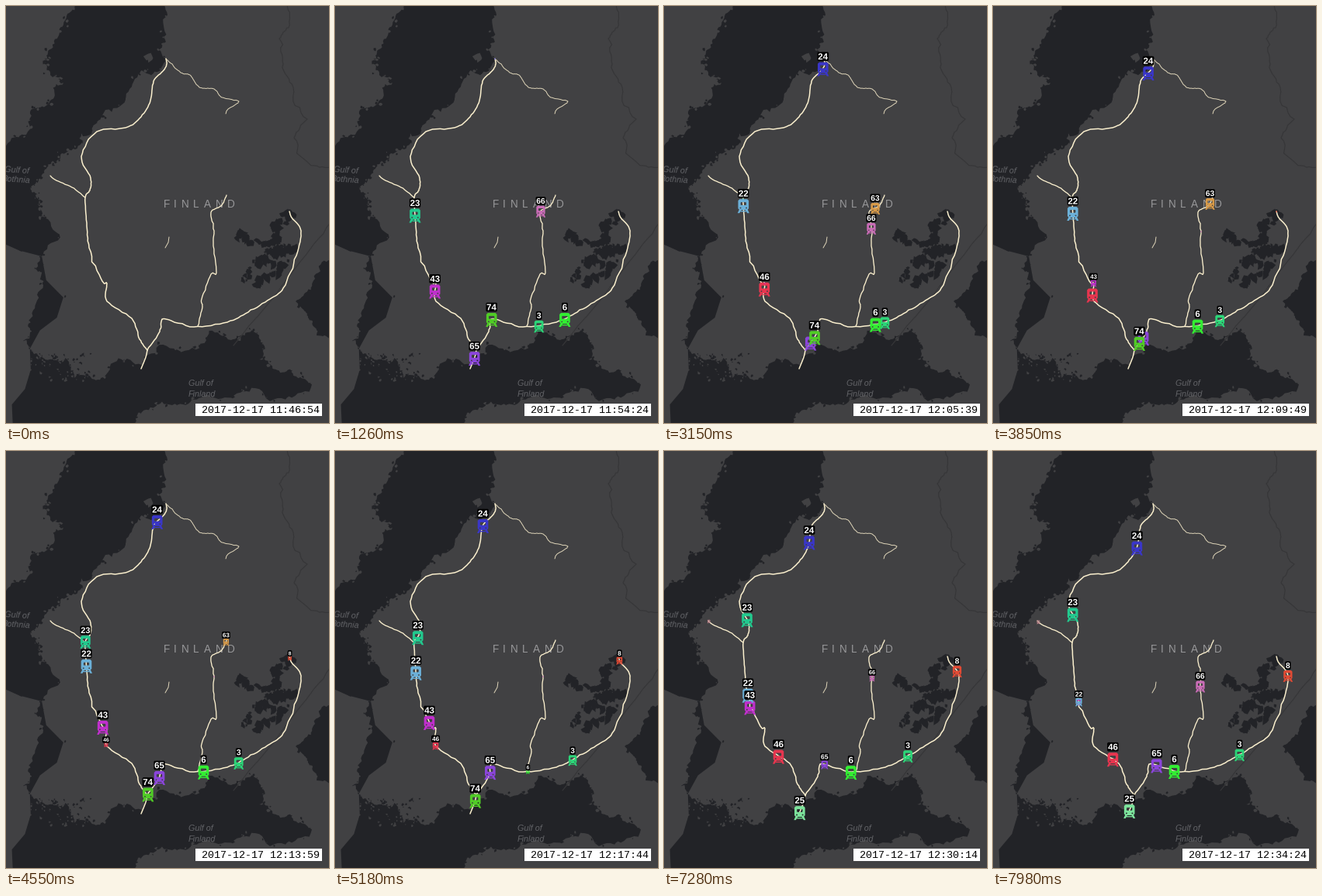
Animation, 416 px wide and 538 px high, one loop 8000 ms. Source, as a matplotlib script:

```python
import numpy as np
import matplotlib.pyplot as plt
from matplotlib.animation import FuncAnimation
from matplotlib.collections import PolyCollection
from matplotlib.patches import PathPatch, Polygon, Rectangle
from matplotlib.path import Path
from matplotlib.textpath import TextPath

W, H, DPI = 416, 538, 100
LOOP, TICK, INTERVAL = 8000, 70, 25
LAND, SEA, BORDER = "#414143", "#222327", "#363638"
RAIL, BRANCH = "#fcf1cf", "#e4dabd"
PT = 72 / DPI

rng = np.random.default_rng(7)
fig = plt.figure(figsize=(W / DPI, H / DPI), dpi=DPI, facecolor=LAND)
ax = fig.add_axes([0, 0, 1, 1])
ax.set_xlim(0, W)
ax.set_ylim(H, 0)
ax.axis("off")


def rough(pts, amount=0.05, levels=2):
    """Midpoint displacement along a polyline."""
    pts = np.array(pts, float)
    for _ in range(levels):
        d = np.diff(pts, axis=0)
        shift = rng.normal(0, amount, (len(d), 1)) * d[:, ::-1] * [1, -1]
        out = np.empty((2 * len(pts) - 1, 2))
        out[::2], out[1::2] = pts, (pts[:-1] + pts[1:]) / 2 + shift
        pts = out
    return pts


def curve(pts, n=4):
    """Catmull-Rom curve through a few points."""
    p = np.array(pts, float)
    p = np.vstack([2 * p[0] - p[1], p, 2 * p[-1] - p[-2]])
    a, b, c, d = (p[k:len(p) - 3 + k, None] for k in range(4))
    t = np.linspace(0, 1, n, endpoint=False)[None, :, None]
    mid = b + t / 2 * (c - a + t * (2 * a - 5 * b + 4 * c - d
                                    + t * (3 * (b - c) + d - a)))
    return np.vstack([mid.reshape(-1, 2), p[-2]])


def area(pts, amount=0.18, levels=4):
    shape = rough(pts + pts[:1], amount, levels)
    ax.add_patch(Polygon(shape, fc=SEA, ec="none", zorder=1))
    return shape


def blobs(centers, radius, color):
    turn = np.arange(6) * np.pi / 3
    ring = np.stack([np.cos(turn), np.sin(turn)], 1)
    shapes = [c + ring * rng.uniform(0.4, 1.5, (6, 1)) * rng.uniform(*radius)
              for c in centers]
    ax.add_collection(PolyCollection(shapes, facecolors=color,
                                     edgecolors="none", zorder=1))


def line(pts, color, width, z=4):
    ax.plot(*np.transpose(pts), color=color, lw=width * PT, zorder=z,
            solid_joinstyle="round", solid_capstyle="round")


def word(x, y, s, px, color, **kw):
    opts = dict(ha="center", va="center", family="Liberation Sans", zorder=3)
    return ax.text(x, y, s, fontsize=px * PT, color=color, **{**opts, **kw})


# Sea and Lake to the east
bay_west = [(98, -15), (74, 24), (54, 58), (53, 78), (74, 99), (55, 126),
            (28, 148), (-15, 192)]
gulf = [(150, 560), (168, 530), (214, 515), (265, 505), (330, 497),
        (394, 488), (364, 470), (326, 456), (326, 425), (290, 431),
        (240, 441), (175, 463), (125, 479), (90, 478), (48, 454)]
bay_east = [(22, 432), (40, 380), (44, 325), (46, 270), (33, 240), (50, 211),
            (72, 190), (97, 164), (128, 134), (166, 94), (203, 74), (203, 40),
            (197, -15)]
coast = area(bay_west + [(-15, 560)] + gulf + bay_east)
area([(430, 328), (398, 352), (373, 381), (389, 402), (400, 425), (430, 436)])
blobs([(182, 66), (184, 65), (187, 67)], (4, 6), LAND)

# Skerries and inlets
inside = (coast > 0).all(axis=1) & (coast[:, 1] < H)
shore = coast[inside]
for color, count in ((SEA, 170), (LAND, 130)):
    spots = shore[rng.integers(0, len(shore), count)]
    blobs(spots + rng.normal(0, 2.5, spots.shape), (0.7, 2.2), color)
blobs(rng.uniform([22, 445], [105, 484], (60, 2)), (0.7, 2), LAND)
blobs(rng.uniform([45, 448], [115, 478], (50, 2)), (0.7, 2), SEA)

# Lake district: ragged blobs strung along arms
for arm in ([(296, 296), (348, 310)], [(342, 290), (370, 266)],
            [(350, 316), (368, 314)], [(304, 354), (338, 318)],
            [(324, 360), (362, 330)], [(350, 290), (346, 326)]):
    k = rng.random((24, 1))
    spots = np.array(arm[0]) * (1 - k) + np.array(arm[1]) * k
    blobs(spots + rng.normal(0, 3, spots.shape), (2, 5.5), SEA)

# Borders
line(rough([(362, -3), (364, 28), (352, 42), (357, 75), (370, 105),
            (388, 146), (371, 170), (390, 203), (418, 208)], 0.1, 3),
     BORDER, 1.2, 1)
line(rough([(418, 279), (375, 335), (293, 438)], 0.03, 3), BORDER, 1.2, 1)

# Place names
for x, ch in zip((206.5, 218, 230.5, 245, 259.5, 275, 290), "FINLAND"):
    word(x, 256.5, ch, 13.5, "#98989a")
for x, y, s, tilt in ((251, 486.5, "Gulf of", 0), (252, 500.5, "Finland", 0),
                      (14, 212, "Gulf of", -4), (13, 224, "Bothnia", -4)):
    word(x, y, s, 10.8, "#626367", style="italic", rotation=tilt)

# Railways
JUNCTION = (182, 444)
north = curve([(206, 68), (207, 75), (203, 83), (190, 97), (186, 122),
               (174, 143), (154, 157), (117, 162), (97, 194), (109, 222),
               (108, 238), (102, 247), (104, 280), (107, 312), (124, 355),
               (130, 358), (130, 381), (162, 403), (172, 430), JUNCTION])
stem = curve([JUNCTION, (180, 453), (174, 468)])
karelia = curve([JUNCTION, (198, 420), (200, 407), (206, 404), (242, 414),
                 (285, 408), (312, 395), (340, 378), (357, 364), (374, 322),
                 (380, 290), (368, 273), (365, 265)])
savo = curve([(247, 413), (253, 388), (252, 378), (264, 346), (271, 344),
              (267, 305), (268, 290), (264, 266), (277, 258), (284, 244)])
coastal = curve([(57, 219), (63, 224), (85, 234), (102, 247)])
north, karelia, savo, coastal = (rough(r, 0.06, 1)
                                 for r in (north, karelia, savo, coastal))
for track, width in ((north, 1.5), (stem, 1.5), (karelia, 1.5),
                     (savo, 1.3), (coastal, 1.3)):
    line(track, RAIL, width)
line(rough(curve([(206, 68), (225, 86), (237, 89), (249, 105), (268, 107),
                  (278, 118), (300, 123), (286, 133), (283, 139)])),
     BRANCH, 0.95)
line([(205, 312), (209, 305), (210, 298)], BRANCH, 0.95)
west = np.vstack([north, stem[1:]])
east = np.vstack([stem[::-1], karelia[1:]])


def box(cx, cy, w, h, c=0.0):
    """Rectangle with cut corners."""
    x, y = w / 2, h / 2
    return np.array([(-x + c, -y), (x - c, -y), (x, -y + c), (x, y - c),
                     (x - c, y), (-x + c, y), (-x, y - c), (-x, -y + c)]) + [cx, cy]


def compound(*rings):
    return Path.make_compound_path(
        *[Path(np.vstack([r, r[:1]]), closed=True) for r in rings])


leg = np.array([(-0.38, 0.4), (-0.18, 0.4), (-0.34, 0.7), (-0.52, 0.7)])
ICON = compound(box(0, -0.06, 0.94, 0.96, 0.13),
                box(0, -0.14, 0.5, 0.26, 0.04)[::-1],
                box(-0.26, 0.24, 0.12, 0.11, 0.02)[::-1],
                box(0.26, 0.24, 0.12, 0.11, 0.02)[::-1],
                leg, (leg * [-1, 1])[::-1], box(0, 0.54, 0.5, 0.09))


def place(path, scale, x, y):
    return Path(path.vertices * scale + [x, y], path.codes)


class Train:
    """Runs from stop to stop; its icon grows with its speed."""

    def __init__(self, label, color, route, stops, full=14.5, ramp=700):
        self.route, self.full, self.ramp = route, full, ramp
        steps = np.hypot(*np.diff(route, axis=0).T)
        self.arc = np.concatenate([[0], np.cumsum(steps)])
        self.stops = [(t, self.locate((x, y))) for t, x, y in stops]
        z = 5 + 0.01 * len(trains)
        self.icon, self.back, self.text = (
            ax.add_patch(PathPatch(Path([(0, 0)]), fc=fc, lw=0, zorder=z + dz))
            for fc, dz in ((color, 0), ("black", 1), ("white", 1.005)))
        self.glyphs = None
        if label:
            tp = TextPath((0, 0), label, size=1,
                          prop=dict(family="Liberation Sans", weight="bold"))
            ext = tp.get_extents()
            mid = [(ext.x0 + ext.x1) / 2, (ext.y0 + ext.y1) / 2]
            self.glyphs = Path((tp.vertices - mid) * [1, -1], tp.codes)
            self.span = ext.width

    def locate(self, p):
        """Arc length of the point on the route closest to p."""
        a, d = self.route[:-1], np.diff(self.route, axis=0)
        k = np.clip(((p - a) * d).sum(1) / (d ** 2).sum(1), 0, 1)
        i = np.argmin(np.hypot(*(a + k[:, None] * d - p).T))
        return self.arc[i] + k[i] * (self.arc[i + 1] - self.arc[i])

    def state(self, t):
        """Arc position and icon size under a trapezoid speed profile."""
        r = self.ramp
        for (t0, a0), (t1, a1) in zip(self.stops, self.stops[1:]):
            if t0 <= t < t1:
                u, v = t - t0, t1 - t
                if u < r:
                    run = u * u / (2 * r)
                elif v < r:
                    run = t1 - t0 - r - v * v / (2 * r)
                else:
                    run = u - r / 2
                speed = min(1, u / r, v / r) if a0 != a1 else 0
                rest = 1.5 if len(self.stops) > 2 else 0
                return (a0 + (a1 - a0) * run / (t1 - t0 - r),
                        max(rest, self.full * speed))
        return 0, 0

    def update(self, t, taken):
        at, s = self.state(t) if t > 0 else (0, 0)
        x, y = (np.interp(at, self.arc, self.route[:, k]) for k in (0, 1))
        self.icon.set_visible(s > 0.8)
        self.icon.set_path(place(ICON, s, x, y))
        show = self.glyphs is not None and s > 2.5
        if show:
            em, ly = 4.2 + 0.5 * s, y - s - 0.8
            w, h = em * self.span + 2.4, em * 0.72 + 3.4
            show = all(abs(x - a) > (w + c) / 2 - 1 or abs(ly - b) > (h + d) / 2 - 1
                       for a, b, c, d in taken)
        if show:
            taken.append((x, ly, w, h))
            self.back.set_path(compound(box(x, ly, w, h, 1.2)))
            self.text.set_path(place(self.glyphs, em, x, ly))
        self.back.set_visible(show)
        self.text.set_visible(show)


trains = []


def add(*args, **kw):
    trains.append(Train(*args, **kw))


# Stops: time in ms, x, y
add("46", "#e8354f", west, [(2300, 130, 359), (4800, 129, 379), (9000, 160, 402)])
add("43", "#c02fcc", west, [(-600, 130, 384), (2500, 130, 358),
                            (3500, 130, 358), (8300, 112, 323)])
add("23", "#22c98e", west, [(-700, 104, 295), (2900, 103, 249),
                            (3900, 103, 249), (9500, 98, 198)])
add("22", "#6bb0d8", west, [(2150, 103, 248), (8400, 112, 325)])
add("24", "#3a36c8", west, [(1100, 206, 68), (9700, 181, 133)], ramp=1600)
add("63", "#d89a48", savo, [(2100, 264, 266), (5000, 284, 244)], full=12)
add("66", "#c96cb6", savo, [(-500, 277, 254), (3900, 267, 291),
                            (6900, 267, 291), (9000, 268, 314)], full=12)
add("3", "#2bd678", east, [(-500, 246, 413), (5800, 309, 397),
                           (9000, 321, 390)], full=12.5)
add("6", "#32ee32", east, [(-500, 312, 395), (5400, 248, 413),
                           (6250, 248, 413), (9000, 227, 410)])
add("8", "#e24a34", east, [(3500, 365, 265), (10500, 380, 301)],
    full=12, ramp=2500)
add("65", "#8b45da", east, [(-200, 175, 466), (6850, 206, 404), (9000, 215, 406)])
add("25", "#7ce29b", east, [(6150, 174, 468), (10000, 177, 459)], ramp=900)
add("74", "#50cc26", east, [(-500, 220, 408), (6750, 175, 466)])
add("", "#b88088", coastal, [(5900, 57, 219), (10000, 60, 222)], full=4, ramp=1500)

# Clock
ax.add_patch(Rectangle((244, 513), 163, 16, fc="white", ec="none", zorder=9))
clock = word(252.5, 525, "", 13.33, "black", ha="left", va="baseline",
             family="Liberation Mono", zorder=10)


def draw(i):
    # A tick that starts within this frame is already shown
    step = (i * INTERVAL + INTERVAL - 1) // TICK
    sec = 11 * 3600 + 46 * 60 + 54 + 25 * step
    clock.set_text(f"2017-12-17 {sec // 3600}:{sec // 60 % 60:02d}:{sec % 60:02d}")
    taken = []
    for train in reversed(trains):
        train.update(step * TICK, taken)
    return [clock]


anim = FuncAnimation(fig, draw, frames=LOOP // INTERVAL, interval=INTERVAL,
                     init_func=lambda: draw(0), repeat=True, repeat_delay=0)
plt.show()
```
